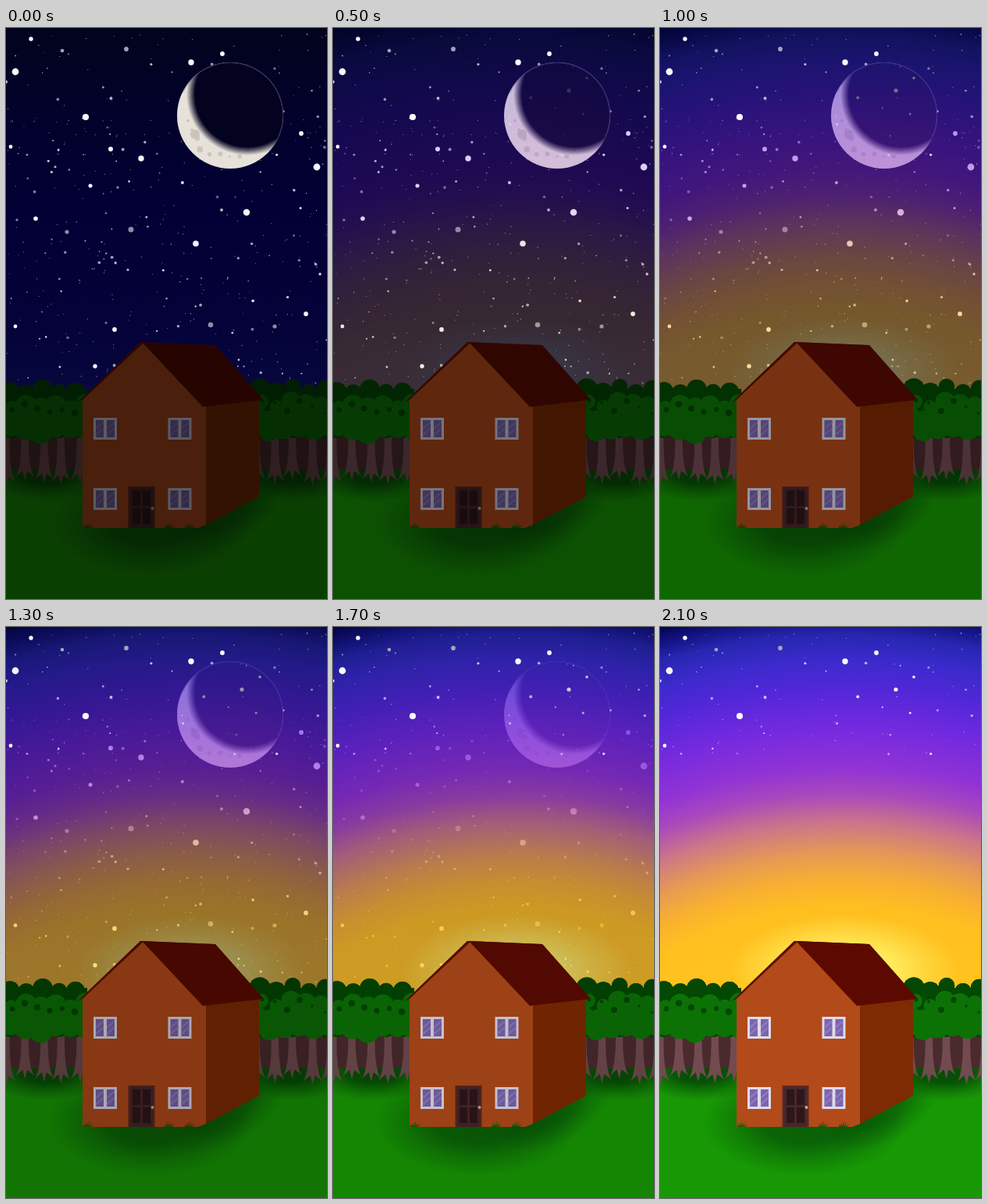
An HTML page with a canvas for the animation above (2.3 s loop, 411 px wide and 731 px high).

```html
<!DOCTYPE html>
<html lang="en">
<head>
<meta charset="utf-8">
<title>Sunrise</title>
<style>
html, body { margin: 0; width: 100%; height: 100%; overflow: hidden; background: #000; }
canvas { display: block; width: 411px; height: 731px; }
</style>
</head>
<body>
<canvas id="stage" width="411" height="731"></canvas>
<script>
const W = 411, H = 731, LOOP = 2300, STEPS = 20;

function layer(paint) {
  const c = document.createElement('canvas');
  c.width = W;
  c.height = H;
  paint(c.getContext('2d'));
  return c;
}

function seeded(s) {
  return () => (s = (s * 16807) % 2147483647) / 2147483647;
}

function poly(g, color, ...p) {
  g.fillStyle = color;
  g.beginPath();
  for (let i = 0; i < p.length; i += 2) g.lineTo(p[i], p[i + 1]);
  g.closePath();
  g.fill();
}

function box(g, color, x, y, w, h) {
  g.fillStyle = color;
  g.fillRect(x, y, w, h);
}

function dot(g, color, x, y, r) {
  g.fillStyle = color;
  g.beginPath();
  g.arc(x, y, r, 0, 7);
  g.fill();
}

function shade(grad, ...stops) {
  stops.forEach(([at, color]) => grad.addColorStop(at, color));
  return grad;
}

// Soft ellipse that fades smoothly to its rim
function glow(g, x, y, rx, ry, rgb, alpha, turn = 0) {
  g.save();
  g.translate(x, y);
  g.rotate(turn);
  g.scale(rx, ry);
  g.fillStyle = shade(g.createRadialGradient(0, 0, 0, 0, 0, 1),
    [0, `rgba(${rgb},${alpha})`], [0.4, `rgba(${rgb},${alpha * 0.9})`],
    [0.72, `rgba(${rgb},${alpha * 0.38})`], [1, `rgba(${rgb},0)`]);
  g.fillRect(-1, -1, 2, 2);
  g.restore();
}

// The brightest stars; all others are scattered
const highStars = [[12, 56, 4.4], [102, 114, 4.1], [237, 44, 3.7], [277, 33, 2.9],
  [32, 14, 2.7], [302, 80, 2.6], [6, 152, 2.4], [325, 64, 1.8]];
const lowStars = [[398, 178, 4.4], [308, 236, 4.3], [243, 276, 3.8], [173, 167, 3.7],
  [134, 155, 3], [378, 135, 2.9], [139, 386, 2.9], [384, 366, 2.9], [38, 244, 2.8],
  [114, 433, 2.7], [108, 202, 2.5], [12, 382, 2.4]];
const dimStars = [[160, 258, 3.5], [262, 380, 3.3], [344, 382, 2.6], [78, 261, 2.6]];

function scatter(g, seed, count, top, bottom) {
  const rnd = seeded(seed);
  for (let i = 0; i < count; i++) {
    const x = rnd() * W, y = top + rnd() * (bottom - top);
    const r = 0.5 + 1.5 * rnd() ** 4;
    dot(g, `rgba(250,250,255,${0.4 + rnd() * 0.5})`, x, y, r);
  }
}

function upperStars(g) {
  scatter(g, 41, 90, 6, 166);
  for (const s of highStars) dot(g, '#fbfaff', ...s);
  dot(g, '#a3a3bd', 154, 27, 2.9);
  dot(g, '#a3a3bd', 72, 29, 2.3);
}

function moon(g) {
  const x = 287, y = 112, r = 68, rnd = seeded(23);
  g.save();
  g.beginPath();
  g.arc(x, y, r, 0, 7);
  g.clip();
  box(g, '#e6e1d9', x - r, y - r, 2 * r, 2 * r);
  // Craters follow the lit edge
  for (let a = 1.1; a < 3.1; a += 0.24) {
    const d = 50 + rnd() * 10;
    dot(g, '#cdc6bc', x + d * Math.cos(a), y + d * Math.sin(a), 1.5 + rnd() * 2.5);
  }
  dot(g, '#cbc4ba', 242, 136, 6);
  g.fillStyle = shade(g.createRadialGradient(309, 85, 0, 309, 85, 78),
    [0, '#03021f'], [0.86, '#03021f'], [0.92, 'rgba(6,4,32,.6)'], [1, 'rgba(10,8,30,0)']);
  g.fillRect(x - r, y - r, 2 * r, 2 * r);
  g.restore();
  g.strokeStyle = 'rgba(98,90,135,.45)';
  g.lineWidth = 1.2;
  g.beginPath();
  g.arc(x, y, r - 0.6, 3.6, 6.7);
  g.stroke();
}

const night = layer(g => {
  g.fillStyle = shade(g.createLinearGradient(0, 0, 0, 470),
    [0, '#02031c'], [0.2, '#02022a'], [0.45, '#020033'], [0.8, '#040238'], [1, '#08083e']);
  g.fillRect(0, 0, W, H);
  upperStars(g);
  scatter(g, 977, 330, 115, 455);
  for (const s of lowStars) dot(g, '#f5f4ff', ...s);
  for (const s of dimStars) dot(g, '#8c8ca6', ...s);
  moon(g);
});

const dawn = layer(g => {
  // Wide arcs around a point far below the horizon
  g.fillStyle = shade(g.createRadialGradient(235, 850, 380, 235, 850, 880),
    [0, '#ffc41e'], [0.22, '#ffc01f'], [0.29, '#f8b031'], [0.36, '#e59a54'],
    [0.44, '#cb758a'], [0.51, '#aa4abb'], [0.58, '#9133d5'], [0.68, '#752adf'],
    [0.78, '#5327d8'], [0.86, '#3a2acb'], [0.92, '#2726b0'], [0.96, '#141485'], [1, '#050555']);
  g.fillRect(0, 0, W, H);
  glow(g, 236, 440, 148, 72, '255,243,105', 0.95);
  upperStars(g);
});

function trunk(g, x, w, foot) {
  g.fillStyle = '#714b50';
  g.beginPath();
  g.moveTo(x - w / 2, 510);
  g.quadraticCurveTo(x - w * 0.3, foot - 15, x - w * 1.2, foot - 2);
  g.lineTo(x - w * 0.3, foot - 10);
  g.lineTo(x, foot + 2);
  g.lineTo(x + w * 0.3, foot - 10);
  g.lineTo(x + w * 1.2, foot - 3);
  g.quadraticCurveTo(x + w * 0.3, foot - 16, x + w / 2, 510);
  g.fill();
}

function trees(g, left, right, seed) {
  const rnd = seeded(seed), deep = '#034803', leaf = '#0c7206';
  const near = n => (rnd() - 0.5) * 2 * n;
  const mid = (left + right) / 2;
  glow(g, mid, 568, 85, 38, '3,66,6', 0.9);
  box(g, '#4b2a2e', left, 505, right - left, 60);
  for (let x = left + 2; x < right + 4; x += 23) trunk(g, x + near(2), 10, 580 + near(5));
  box(g, deep, left, 462, right - left, 58);
  for (let x = left + 5; x < right; x += 21) {
    dot(g, deep, x, 464 + near(5), 12 + near(2));
    dot(g, deep, x, 512, 13);
  }
  // Three rows of lit leaves, larger below
  for (const [y, r] of [[483, 11], [497, 14], [513, 15]]) {
    for (let x = left + near(8); x < right + 8; x += 19) dot(g, leaf, x, y + near(5), r + near(3));
  }
  for (let x = left + 8; x < right; x += 16) dot(g, deep, x, 488 + near(12), 3 + near(1.5));
}

function windowAt(g, x, y) {
  box(g, '#e0dbea', x, y, 30, 28);
  for (const px of [x + 3, x + 17]) {
    box(g, '#7c64ad', px, y + 3, 10, 22);
    for (const py of [y + 12, y + 20]) poly(g, '#8e78bf', px, py, px + 10, py - 8, px + 10, py - 5, px, py + 4);
  }
}

function tuft(g, x, y) {
  for (let i = -2; i <= 2; i++) poly(g, '#0b5a08', x + i * 2 - 1, y + 2, x + i * 3 + 2, y - 6 + Math.abs(i) * 2, x + i * 2 + 1, y + 2);
}

function house(g) {
  poly(g, '#b24a19', 98, 640, 98, 476, 175, 402, 256, 484, 256, 636, 246, 640);
  poly(g, '#7e2a03', 256, 482, 324, 476, 324, 600, 256, 636);
  poly(g, '#650e03', 172, 402, 177, 402, 98, 476, 92, 479);
  poly(g, '#5c0a01', 174, 402, 268, 406, 330, 476, 252, 485);
  for (const y of [499, 589]) for (const x of [112, 207.5]) windowAt(g, x, y);
  box(g, '#5a2a24', 156.5, 587, 34, 53);
  box(g, '#4a2629', 159, 589, 29, 51);
  for (const y of [592, 615]) for (const x of [162, 175]) box(g, '#2c171b', x, y, 10, 20);
  dot(g, '#d2a982', 187.5, 615, 2);
  for (const x of [104, 208, 234]) tuft(g, x, 638);
}

function ground(g) {
  box(g, '#179804', 0, 560, W, H - 560);
  trees(g, 0, 104, 7);
  trees(g, 320, W, 19);
  glow(g, 185, 634, 130, 68, '4,72,8', 0.72);
  glow(g, 280, 616, 82, 46, '4,72,8', 0.6, -0.5);
  house(g);
}

const dayLand = layer(ground);
const nightLand = layer(g => {
  ground(g);
  g.globalCompositeOperation = 'source-atop';
  box(g, 'rgba(0,0,0,.59)', 0, 0, W, H);
});

const ctx = document.getElementById('stage').getContext('2d');

function blend(from, to, amount) {
  ctx.globalAlpha = 1;
  ctx.drawImage(from, 0, 0);
  ctx.globalAlpha = amount;
  ctx.drawImage(to, 0, 0);
}

function draw() {
  const t = performance.now() % LOOP;
  const step = Math.min(STEPS, Math.max(0, Math.floor(t / 100) - 1));
  const light = step / STEPS;
  blend(night, dawn, light);
  blend(nightLand, dayLand, light);
  requestAnimationFrame(draw);
}
draw();
</script>
</body>
</html>
```
